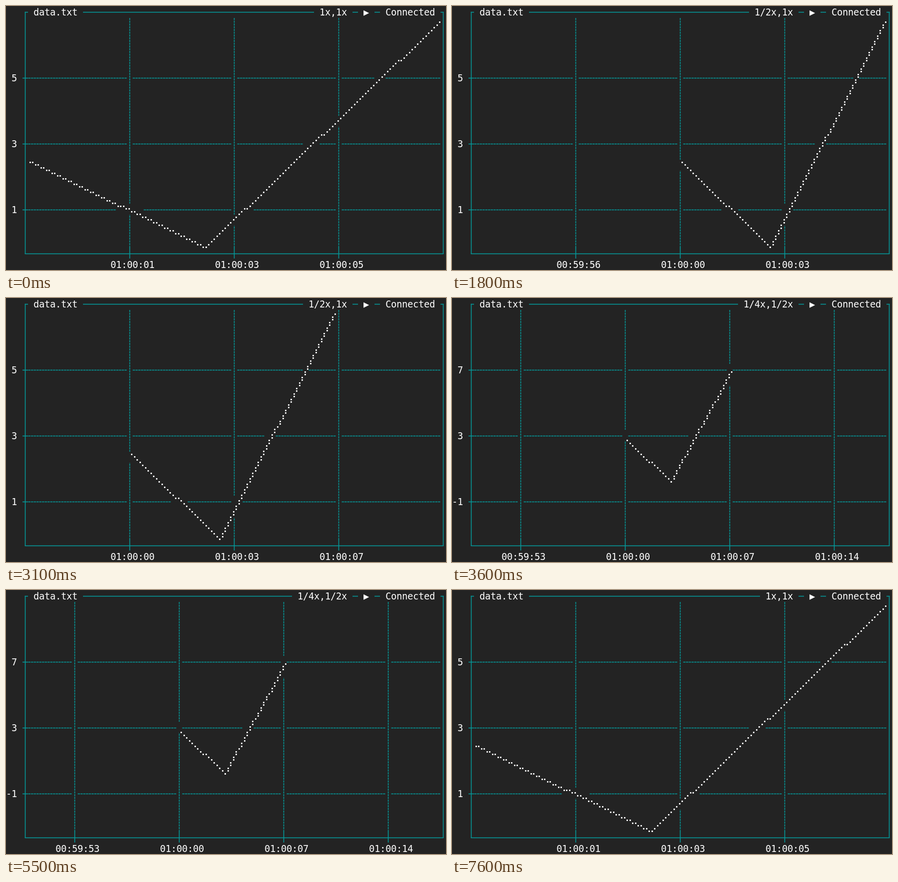
Write an HTML page with a canvas that moves like this. It is 880 px wide and 529 px high and loops after 8 s.

```html
<!DOCTYPE html>
<html lang="en">
<head>
<meta charset="utf-8">
<title>Terminal plot</title>
<style>
  html, body { margin: 0; width: 100%; height: 100%; overflow: hidden; background: #232323; }
  canvas { display: block; }
</style>
</head>
<body>
<canvas id="stage" width="880" height="529"></canvas>
<script>
const ctx = document.getElementById('stage').getContext('2d', { alpha: false });
const BG = '#232323', TEAL = '#06989a', WHITE = '#fff';
const CW = 11, CH = 22;            // terminal cell
const RIGHT = 79, BOTTOM = 22;     // frame column and row
const Y_ROWS = [6, 12, 18];
const LINE = 1.6, DASH = 5.5, DOT = 2.8;
const LOOP = 8000;
const DOT_SECONDS = 0.0461;        // one braille dot of time at 1x

// The data: a fall and a rise, in braille dots at 1x from its first sample.
const DATA = [{ x: 0, y: 0 }, { x: 64, y: 30.7 }, { x: 149, y: -50.7 }];

// A view has its zoom, the dot where the data starts and its first time tick.
const view = (zx, zy, x, y, tick, left = 3, step = 19) => ({ zx, zy, x, y, tick, left, step });
const full = view(1, 1, 8, 56, 22);
const close = view(2, 1, -141, 56, 22);
const half = view(1 / 2, 1, 82.5, 56, 22);
const halfPan = view(1 / 2, 1, 63, 56, 12);
const halfPan2 = view(1 / 2, 1, 44.9, 56, 22);
const quarter = view(1 / 4, 1 / 2, 63.4, 51, 12);
const eighth = view(1 / 8, 1 / 4, 73.8, 48.7, 18, 4, 18.67);

const timeline = [
  [0, full], [500, close], [1100, full], [1800, half], [2700, halfPan], [3100, halfPan2],
  [3600, quarter], [4700, halfPan2], [5500, quarter], [6300, eighth], [7600, full]
];

const zoomName = z => (z < 1 ? '1/' + 1 / z : z) + 'x';

function clock(seconds) {
  const total = 3600 + Math.floor(seconds);
  return [total / 3600, total / 60 % 60, total % 60]
    .map(n => String(Math.floor(n)).padStart(2, '0')).join(':');
}

function text(str, col, row) {
  ctx.fillStyle = WHITE;
  [...str].forEach((c, i) => ctx.fillText(c, (col + i) * CW, row * CH + 19));
}

function hline(x0, x1, row) {
  ctx.fillStyle = TEAL;
  ctx.fillRect(x0, row * CH + 11.7, x1 - x0, LINE);
}

function vline(col, y0, y1) {
  ctx.fillStyle = TEAL;
  ctx.fillRect(col * CW + 4.7, y0, LINE, y1 - y0);
}

function drawGrid({ zx, zy, x, tick, left, step }) {
  const ticks = [];
  for (let c = tick; c < RIGHT; c += step) ticks.push(Math.floor(c));

  Y_ROWS.forEach((row, i) => {
    for (let px = (left + 1) * CW; px < RIGHT * CW; px += DASH) {
      if (!ticks.includes(Math.floor(px / CW))) hline(px + 0.4, px + 5, row);
    }
    hline(left * CW, (left + 1) * CW, row);
    const label = String(Math.round(3 + (1 - i) * 2.2 / zy));
    text(label, left - 1 - label.length, row);
  });

  for (const col of ticks) {
    for (let y = CH + 2; y < BOTTOM * CH; y += DASH) vline(col, y, y + 4.2);
    vline(col, BOTTOM * CH, (BOTTOM + 1) * CH);
    text(clock((col * 2 + 1.8 - x) / zx * DOT_SECONDS + 0.1), col - 3, BOTTOM + 1);
  }
}

function drawFrame({ left, zx, zy }) {
  const x0 = left * CW + 4.7, x1 = RIGHT * CW + 6.3;
  const zoom = zoomName(zx) + ',' + zoomName(zy);
  const zoomCol = 62 - zoom.length;
  vline(left, 11.7, BOTTOM * CH + 13);
  vline(RIGHT, 11.7, BOTTOM * CH + 13);
  hline(x0, x1, BOTTOM);
  hline(x0, (left + 1) * CW, 0);
  hline((left + 11) * CW, (zoomCol - 1) * CW, 0);
  hline(63 * CW, 64 * CW, 0);
  hline(67 * CW, 68 * CW, 0);
  hline(RIGHT * CW, x1, 0);
  text('data.txt', left + 2, 0);
  text(zoom, zoomCol, 0);
  text('▶', 65, 0);
  text('Connected', 69, 0);
}

function curveDots({ zx, zy, x, y, left }) {
  const knots = DATA.map(p => [Math.round(x + p.x * zx), Math.round(y + p.y * zy)]);
  const dots = [];
  for (let i = 1; i < knots.length; i++) {
    const [x0, y0] = knots[i - 1], [x1, y1] = knots[i];
    const n = Math.max(Math.abs(x1 - x0), Math.abs(y1 - y0));
    for (let k = 0; k <= n; k++) {
      dots.push([Math.round(x0 + (x1 - x0) * k / n), Math.round(y0 + (y1 - y0) * k / n)]);
    }
  }
  return dots.filter(d => d[0] > left * 2);
}

function drawCurve(v) {
  const dots = curveDots(v);
  ctx.fillStyle = BG;
  for (const [x, y] of dots) ctx.fillRect((x >> 1) * CW, (y >> 2) * CH, CW, CH);
  ctx.fillStyle = WHITE;
  for (const [x, y] of dots) {
    ctx.fillRect((x >> 1) * CW + (x & 1 ? 8 : 3), Math.round(3.7 + 5.5 * y), DOT, DOT);
  }
}

function draw(v) {
  ctx.fillStyle = BG;
  ctx.fillRect(0, 0, 880, 529);
  ctx.font = '18.67px "DejaVu Sans Mono", monospace';
  drawGrid(v);
  drawFrame(v);
  drawCurve(v);
}

const start = performance.now();
let shown = null;
function frame() {
  const t = (performance.now() - start) % LOOP;
  const current = timeline.filter(s => s[0] <= t).pop()[1];
  if (current !== shown) draw(shown = current);
  requestAnimationFrame(frame);
}
frame();
</script>
</body>
</html>
```
